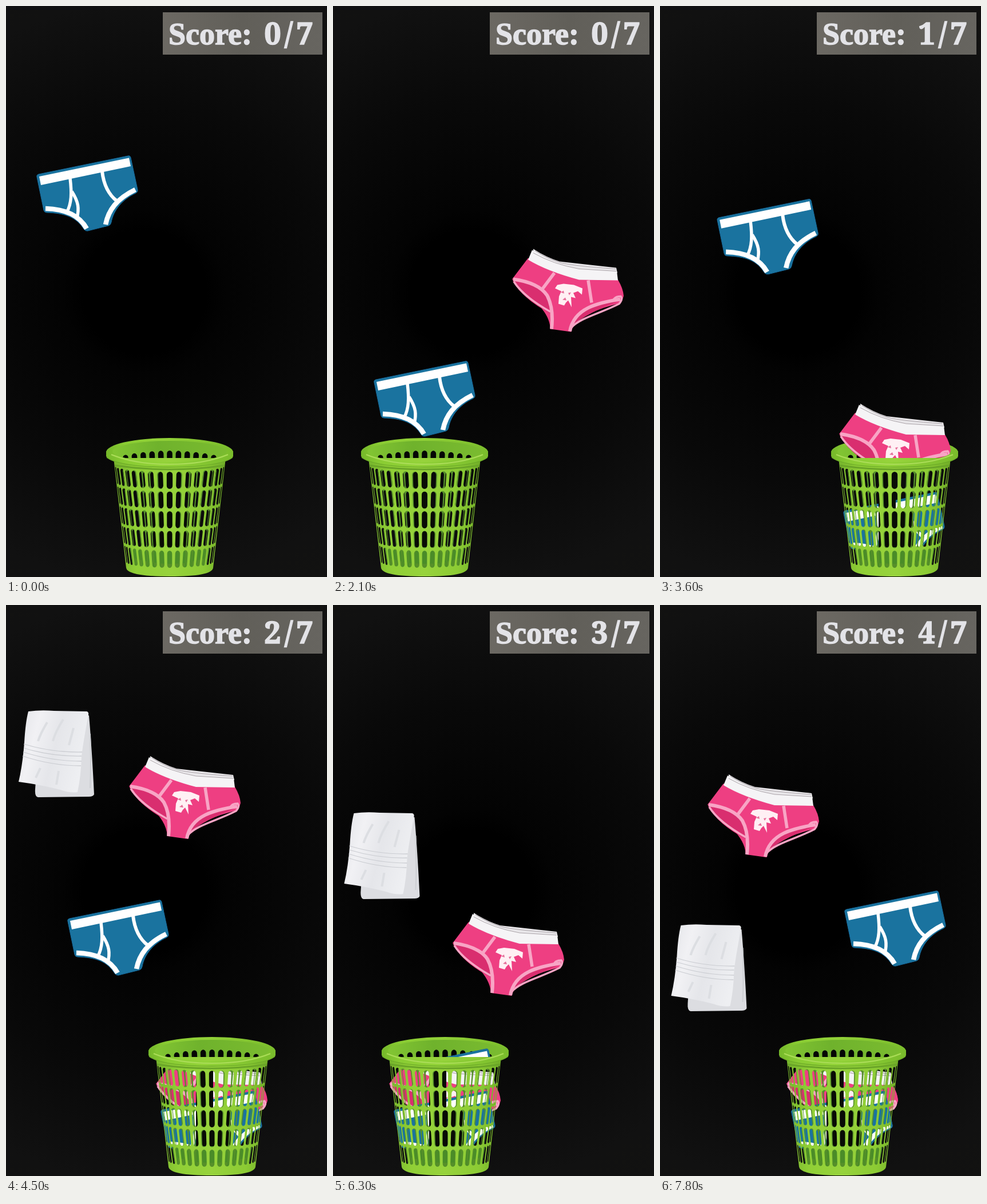
An HTML page for the animation above (8 s loop, 561 by 998 pixels).

```html
<!DOCTYPE html>
<html lang="en">
<head>
<meta charset="utf-8">
<title>Laundry catch</title>
<style>
html, body { margin: 0; width: 100%; height: 100%; overflow: hidden; background: #050505; }
svg { display: block; width: 100%; height: 100%; }
text { font-family: "Liberation Serif", "Noto Serif", serif; font-weight: bold; fill: #e3e3e7; stroke: #e3e3e7; stroke-width: 1.5; }
.digits text { font-family: "Noto Serif", "Liberation Serif", serif; }
.line { fill: none; }
</style>
</head>
<body>
<svg viewBox="0 0 561 998" preserveAspectRatio="none">
  <defs>
    <radialGradient id="room" gradientUnits="userSpaceOnUse" cx="242" cy="500" r="600">
      <stop offset=".18" stop-color="#000"/>
      <stop offset=".24" stop-color="#030303"/>
      <stop offset=".55" stop-color="#090909"/>
      <stop offset=".85" stop-color="#111"/>
      <stop offset="1" stop-color="#121211"/>
    </radialGradient>
    <linearGradient id="panel" x1="0" y1="0" x2="1" y2="0">
      <stop offset="0" stop-color="#6c6963"/>
      <stop offset=".5" stop-color="#615f59"/>
      <stop offset="1" stop-color="#676560"/>
    </linearGradient>
    <linearGradient id="plastic" x1="0" y1="0" x2="1" y2="0">
      <stop offset="0" stop-color="#76b42c"/>
      <stop offset=".2" stop-color="#90cf36"/>
      <stop offset=".5" stop-color="#97d33c"/>
      <stop offset=".8" stop-color="#8ccb34"/>
      <stop offset="1" stop-color="#70ad28"/>
    </linearGradient>
    <linearGradient id="rim" x1="0" y1="0" x2="1" y2="0">
      <stop offset="0" stop-color="#75b82a"/>
      <stop offset=".15" stop-color="#8acc33"/>
      <stop offset=".45" stop-color="#92d238"/>
      <stop offset="1" stop-color="#7abc2c"/>
    </linearGradient>
    <linearGradient id="inside" x1="0" y1="0" x2="1" y2="0">
      <stop offset="0" stop-color="#82c533"/>
      <stop offset=".4" stop-color="#6fb22c"/>
      <stop offset="1" stop-color="#7abb30"/>
    </linearGradient>
    <linearGradient id="cotton" x1="0" y1="0" x2="1" y2=".3">
      <stop offset="0" stop-color="#e3e4e8"/>
      <stop offset=".3" stop-color="#f1f1f4"/>
      <stop offset=".6" stop-color="#e5e6ea"/>
      <stop offset="1" stop-color="#eeeff2"/>
    </linearGradient>
    <clipPath id="mouth"><ellipse cx="286" cy="779" rx="100" ry="19"/></clipPath>
    <clipPath id="above"><rect width="561" height="800"/></clipPath>

    <g id="blue">
      <path d="M57 294L213 262Q217 261 218 265L230 321Q231 325 227 327C203 338 188 357 184 378Q183 383 179 384L143 393Q139 394 136 390C123 369 103 362 71 361Q67 361 66 357L54 299Q53 295 57 294Z" fill="#1a739f" stroke="#17699a"/>
      <path d="M58 298L215 265.500L218 280L61 313Z" fill="#fff"/>
      <g class="line" stroke="#fff">
        <path d="M69 354C105 355 128 366 141 389M226 321C193 337 179 357 174 382" stroke-width="8.500"/>
        <path d="M112 301C115 326 115 345 106 361M115 324C127 343 128 354 124 371" stroke-width="5.500"/>
        <path d="M168 289C171 315 181 331 194 341" stroke-width="6"/>
      </g>
    </g>

    <g id="pink">
      <path d="M350 264Q373 279 396 286Q440 291 495 297L497 306L430 308L350 280Z" fill="#e9e7ea"/>
      <path class="line" d="M353 267Q376 282 398 288T494 299" stroke="#aaa3a8"/>
      <path d="M341 280Q375 303 430 316L498 318Q507 333 508 346Q506 355 501 359C465 368 424 382 416 409L380 404C378 370 345 350 313 317Z" fill="#ee3f82"/>
      <path d="M314 319Q360 324 375 347Q381 360 382 378Q330 351 314 319ZM503 354C465 358 432 366 417 399Q445 375 503 354Z" fill="#d92e6f"/>
      <g class="line" stroke="#f8a5c5">
        <path d="M315 317Q359 323 374 345Q386 367 382 404M502 352C464 358 421 367 414 408" stroke-width="6"/>
        <path d="M316 321Q332 347 380 374M416 402C432 384 467 377 500 360Q507 352 503 347Q492 347 490 354" stroke-width="3.500"/>
        <path d="M387 306L366 334M446 319L452 358" stroke-width="5.500"/>
      </g>
      <path d="M348 266Q384 290 430 299L496 303L498 319L430 318Q374 303 341 283Z" fill="#f5f4f6"/>
      <path class="line" d="M350 271Q385 291 430 299L495 303" stroke="#aaa3a8"/>
      <path d="M388 333L392 327L403 325L421 327L436 333L435 344L428 338L420 341L424 350L416 348L417 366L411 354L407 358L404 363L394 360L395 347L399 338Z" fill="#fff0f4"/>
      <path d="M398 340l5-3l1 5zM411 341l5-1l-3 5zM401 353l5-4l2 5z" fill="#e5709a"/>
    </g>

    <g id="towel">
      <path d="M60 190L145 193Q150 250 154 331Q152 335 145 335L56 336Q50 335 51 322Z" fill="#dcdde1"/>
      <path class="line" d="M147 225Q149 270 147 320" stroke="#cdcfd3" stroke-width="2"/>
      <path d="M39 186Q60 183 84 185L141 186Q145 187 144 192Q134 245 132 265Q131 300 125 327Q112 329 95 323Q60 314 22 309Q29 280 32 240Q34 205 39 186Z" fill="url(#cotton)"/>
      <g class="line" stroke="#cbcdd2" stroke-width="1.300">
        <path d="M31 243Q80 258 133 257M31 250Q80 265 132 264M30 257Q80 273 132 273M29 264Q80 281 131 281"/>
        <path d="M72 205Q60 225 56 238M100 200Q86 222 82 238M118 215L110 245M60 285L52 302M92 290L88 314" stroke="#dcdee2" stroke-width="4"/>
      </g>
    </g>
  </defs>

  <rect width="561" height="998" fill="url(#room)"/>
  <g id="resting"></g>
  <g id="back">
    <path d="M258 812H288V878H319V946H258Z" fill="#080b05"/>
    <path d="M216 946H356L350 980Q286 997 222 980Z" fill="#4a8c28"/>
    <path id="wall" fill="#568f2a" fill-rule="evenodd"/>
    <ellipse cx="286" cy="780" rx="111" ry="25" fill="url(#rim)"/>
    <ellipse cx="286" cy="779" rx="100" ry="19" fill="url(#inside)"/>
    <path id="vents" fill="#050505" clip-path="url(#mouth)"/>
  </g>
  <g id="falling" clip-path="url(#above)"></g>
  <g id="front">
    <path id="body" fill="url(#plastic)" fill-rule="evenodd"/>
    <path class="line" d="M190 803Q286 817 382 803" stroke="#6aa528" stroke-width="3"/>
    <path d="M175 778L175 787Q177 791 186 795Q225 806 286 806T386 795Q396 791 397 787V778H386A100 19 0 0 1 186 778Z" fill="url(#rim)"/>
    <path class="line" d="M184 784Q225 801 286 801T388 784" stroke="#abdd58" stroke-width="2"/>
    <path class="line" d="M176 789Q200 806 286 806T396 789" stroke="#6dab28" stroke-width="1.500"/>
  </g>
  <rect x="274" y="11" width="279" height="74" fill="url(#panel)"/>
  <text x="284" y="67" font-size="54">Score:</text>
  <g class="digits" font-size="52" text-anchor="middle">
    <text id="score" x="466" y="67">0</text>
    <text x="494" y="67">/</text>
    <text x="522" y="67">7</text>
  </g>
</svg>
<script>
const LOOP = 8000, STEP = 300, CATCH_Y = 750;
const $ = id => document.getElementById(id);

// Rounded slot from (x0, y0) down to (x1, y1), w wide on each side.
function slot(x0, y0, x1, y1, w) {
  const r = Math.min(5.5, w + 1);
  return `M${x0 - w} ${y0 + r}A${w} ${r} 0 0 1 ${x0 + w} ${y0 + r}` +
    `L${x1 + w} ${y1 - r}A${w} ${r} 0 0 1 ${x1 - w} ${y1 - r}Z`;
}

// Tapered cylinder grid; holes get narrower and rise towards the sides.
function grid(scale, halfWidth, sag) {
  const radius = y => scale * (97 - (y - 800) * 0.118);
  let d = '';
  for (let row = 0; row < 5; row++) {
    const top = 814 + row * 34.5, bottom = top + 30;
    for (let col = -8; col <= 8; col++) {
      const a = col * 10.2 * Math.PI / 180, lift = sag * (1 - Math.cos(a));
      const x = y => 286 + radius(y) * Math.sin(a);
      const w = Math.max(0.8, halfWidth * Math.cos(a) * radius(top) / 97);
      d += slot(x(top), top - lift, x(bottom), bottom - lift, w);
    }
  }
  return d;
}

$('body').setAttribute('d', 'M188 790L210 982Q212 997 286 997T362 982L384 790Z' + grid(1, 5.3, 10));
$('wall').setAttribute('d', 'M203 796L224 965Q286 985 348 965L369 796Z' + grid(0.86, 6.8, 4));
let vents = '';
for (let i = -5; i <= 5; i++) {
  const x = 286 + i * 15.4, y = 777 + i * i * 0.3;
  vents += slot(x, y, x - i * 0.4, y + 32, 4.8);
}
$('vents').setAttribute('d', vents);

// Left edge of the basket: [time, x]
const basket = [[0, 175], [1200, 72], [1500, 49], [2700, 49], [3000, 136], [3600, 299], [4200, 299],
  [4500, 249], [5100, 128], [5400, 85], [6900, 85], [7500, 196], [7800, 208]];

// Drawn corner of each kind, and its resting place in the basket
const kinds = {
  pink: { x: 313, y: 264, dx: 13, rest: 784 },
  blue: { x: 53, y: 261, dx: 21, rest: 849 },
  towel: { x: 22, y: 184 }
};

// Falls: [time, x, y]; after "land" the piece rides along with the basket.
const pieces = [
  { kind: 'pink', land: 4200, path: [[900, 313, 196], [1200, 313, 264], [3000, 313, 585], [3900, 313, 750]] },
  { kind: 'pink', land: 7800, path: [[4200, 215, 220], [4500, 215, 264], [5100, 215, 352], [6300, 209, 538], [7500, 209, 752]] },
  { kind: 'pink', path: [[7200, 83, 196], [7500, 83, 240], [7800, 83, 296]] },
  { kind: 'blue', land: 3000, path: [[0, 53, 261], [1200, 72, 466], [2100, 71, 620], [2700, 70, 790]] },
  { kind: 'blue', land: 6900, path: [[2700, 94, 185], [3000, 94, 218], [4500, 107, 515], [5100, 107, 603], [6300, 107, 775], [6600, 107, 818]] },
  { kind: 'blue', path: [[6600, 358, 230], [7800, 322, 499]] },
  { kind: 'towel', path: [[4500, 22, 184], [5100, 20, 239], [6300, 19.5, 362], [7800, 19.5, 558]] }
];

for (const p of pieces) {
  p.el = document.createElementNS('http://www.w3.org/2000/svg', 'use');
  p.el.setAttribute('href', '#' + p.kind);
}

function at(keys, t) {
  const i = keys.findIndex(k => k[0] > t);
  if (i < 0) return keys[keys.length - 1].slice(1);
  if (i === 0) return keys[0].slice(1);
  const a = keys[i - 1], b = keys[i], f = (t - a[0]) / (b[0] - a[0]);
  return a.slice(1).map((v, n) => v + (b[n + 1] - v) * f);
}

function move(el, x, y) {
  el.setAttribute('transform', `translate(${x} ${y})`);
}

function draw(t) {
  const [bx] = at(basket, t);
  let score = 0;
  move($('back'), bx - 175, 0);
  move($('front'), bx - 175, 0);
  for (const p of pieces) {
    const k = kinds[p.kind], landed = t >= p.land;
    p.el.remove();
    if (t < p.path[0][0]) continue;
    const [x, y] = landed ? [bx + k.dx, k.rest] : at(p.path, t);
    if (y >= CATCH_Y) score++;
    move(p.el, x - k.x, y - k.y);
    $(landed ? 'resting' : 'falling').append(p.el);
  }
  $('score').textContent = score;
}

const start = performance.now();
let shown = -1;
function tick() {
  const t = (performance.now() - start) % LOOP;
  const now = Math.floor(t / STEP) * STEP;
  if (now !== shown) draw(shown = now);
  requestAnimationFrame(tick);
}
tick();
</script>
</body>
</html>
```
